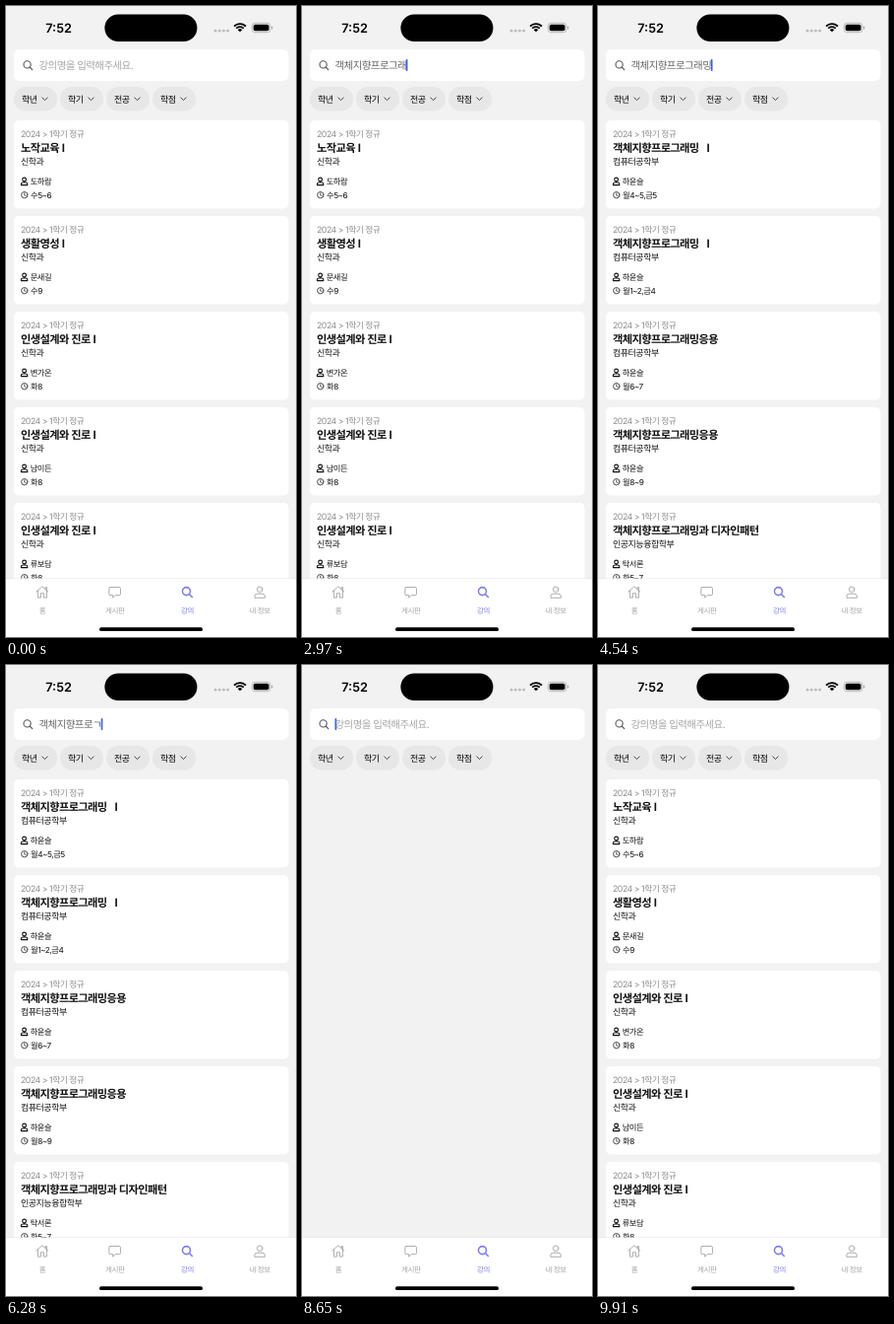
An HTML page with a canvas that plays this animation: 295 by 640 pixels, repeating every 10000 ms.

```html
<!DOCTYPE html>
<html lang="ko">
<head>
<meta charset="utf-8">
<title>강의 검색</title>
<style>
html, body { margin: 0; width: 100%; height: 100%; overflow: hidden; background: #f2f2f2; }
canvas { display: block; width: 295px; height: 640px; }
</style>
</head>
<body>
<canvas id="stage"></canvas>
<script>
const LOOP = 10000, STEP = 105;
const HANGUL = "'Noto Sans CJK KR', 'Noto Sans CJK', sans-serif";
const MIXED = 'Inter, ' + HANGUL;
const ACCENT = '#7d7df2';

const canvas = document.getElementById('stage');
const ctx = canvas.getContext('2d');
const dpr = window.devicePixelRatio || 1;
canvas.width = 295 * dpr;
canvas.height = 640 * dpr;

// Courses: title, department, lecturer, slot
const allCourses = [
  ['노작교육 I', '신학과', '도하람', '수5~6'],
  ['생활영성 I', '신학과', '문새길', '수9'],
  ['인생설계와 진로 I', '신학과', '변가온', '화8'],
  ['인생설계와 진로 I', '신학과', '남이든', '화8'],
  ['인생설계와 진로 I', '신학과', '류보담', '화8']
];
const foundCourses = [
  ['객체지향프로그래밍   I', '컴퓨터공학부', '하윤슬', '월4~5,금5'],
  ['객체지향프로그래밍   I', '컴퓨터공학부', '하윤슬', '월1~2,금4'],
  ['객체지향프로그래밍응용', '컴퓨터공학부', '하윤슬', '월6~7'],
  ['객체지향프로그래밍응용', '컴퓨터공학부', '하윤슬', '월8~9'],
  ['객체지향프로그래밍과 디자인패턴', '인공지능융합학부', '탁서론', '화5~7']
];

// Step tracks: [start time, value]
const queryTrack = [
  [0, ''], [860, 'ㄱ'], [980, '개'], [1220, '객'], [1380, '객체'], [1550, '객쳊'],
  [1700, '객체지'], [1820, '객체지햐'], [2240, '객체지향'], [2420, '객체지향프'],
  [2530, '객체지향프로'], [2680, '객체지향프록'], [2820, '객체지향프로글'],
  [2970, '객체지향프로그래'], [3450, '객체지향프로그래밍'],
  [5770, '객체지향프로그래미'], [5890, '객체지향프로그래ㅁ'], [6010, '객체지향프로그ㄹ'],
  [6150, '객체지향프로그'], [6275, '객체지향프로ㄱ'], [6400, '객체지향프로'],
  [6525, '객체지향프ㄹ'], [6650, '객체지향프'], [6775, '객체지향ㅍ'], [6900, '객체지향'],
  [7140, '객체지ㅎ'], [7260, '객체지'], [7380, '객체ㅈ'], [7500, '객체'],
  [7620, '객ㅊ'], [7870, '객'], [7990, '개'], [8120, '']
];
const caretTrack = [
  [0, 0], [210, .5], [330, 1], [3660, .3], [3765, 0], [3870, .5], [3975, 1],
  [4660, 0], [4900, .5], [5010, 1], [5470, 0], [5770, 1],
  [8755, .5], [8860, 0], [9065, .5], [9170, 1], [9770, .5], [9910, 0]
];
const listFade = [0, 0, .28, .55, .82, 1];
const messageFade = [0, .9, .9, .5, .2, 0];

const valueAt = (track, t) => track.findLast(([start]) => start <= t)[1];

function text(str, x, middle, size, color, { weight = 400, align = 'left', spacing = -.055, family = MIXED } = {}) {
  ctx.font = `${weight} ${size}px ${family}`;
  ctx.letterSpacing = `${spacing * size}px`;
  ctx.textAlign = align;
  ctx.fillStyle = color;
  ctx.fillText(str, x, middle + size * .375);
  return ctx.measureText(str).width;
}

function box(x, y, w, h, r, color) {
  ctx.fillStyle = color;
  ctx.beginPath();
  ctx.roundRect(x, y, w, h, r);
  ctx.fill();
}

function disc(x, y, r, color) {
  ctx.fillStyle = color;
  ctx.beginPath();
  ctx.arc(x, y, r, 0, 7);
  ctx.fill();
}

// Strokes an SVG path drawn around the point (x, y)
function icon(path, x, y, color, width = 1) {
  ctx.save();
  ctx.translate(x, y);
  ctx.strokeStyle = color;
  ctx.lineWidth = width;
  ctx.lineCap = ctx.lineJoin = 'round';
  ctx.stroke(new Path2D(path));
  ctx.restore();
}

const ICONS = {
  magnifier: 'M3 -.6A3.6 3.6 0 1 1 -4.2 -.6A3.6 3.6 0 1 1 3 -.6M2 2L4.6 4.6',
  chevron: 'M-2.7 -1.3L0 1.4L2.7 -1.3',
  lecturer: 'M1.9 -2A1.9 1.9 0 1 1 -1.9 -2A1.9 1.9 0 1 1 1.9 -2M-3.2 3.6V2.8Q-3.2 1 -1.4 1H1.4Q3.2 1 3.2 2.8V3.6Z',
  clock: 'M3.2 0A3.2 3.2 0 1 1 -3.2 0A3.2 3.2 0 1 1 3.2 0M0 -1.8V.2L1.3 .9',
  home: 'M-6 -.3L0 -5.8L6 -.3M3.3 -3V-5H4.6V-1.8M-4.5 -1.5V5.6H-1.5V1.2H1.5V5.6H4.5V-1.5',
  board: 'M-4.7 -5H4.7Q5.8 -5 5.8 -3.9V2Q5.8 3.1 4.7 3.1H.6L-2 5.6V3.1H-4.7Q-5.8 3.1 -5.8 2V-3.9Q-5.8 -5 -4.7 -5Z',
  search: 'M3.1 -.9A4 4 0 1 1 -4.9 -.9A4 4 0 1 1 3.1 -.9M2 2L5 5',
  profile: 'M2.8 -2.8A2.8 2.8 0 1 1 -2.8 -2.8A2.8 2.8 0 1 1 2.8 -2.8M-5.2 5.4V4.2Q-5.2 1.7 -2.7 1.7H2.7Q5.2 1.7 5.2 4.2V5.4Z'
};

function drawStatusBar() {
  text('7:52', 40.2, 22, 12.75, '#000', { weight: 600, spacing: 0 });
  box(100.4, 8.4, 94, 27.6, 13.8, '#000');
  for (let i = 0; i < 4; i++) disc(213 + i * 4.2, 25.2, 1.4, '#bbb');

  const wifiX = 238, wifiY = 26.2, half = .82;
  ctx.strokeStyle = ctx.fillStyle = '#000';
  ctx.lineWidth = 1.9;
  ctx.lineCap = 'butt';
  for (const r of [8.1, 5.1]) {
    ctx.beginPath();
    ctx.arc(wifiX, wifiY, r, -Math.PI / 2 - half, -Math.PI / 2 + half);
    ctx.stroke();
  }
  ctx.beginPath();
  ctx.moveTo(wifiX, wifiY);
  ctx.arc(wifiX, wifiY, 3, -Math.PI / 2 - half, -Math.PI / 2 + half);
  ctx.fill();

  ctx.strokeStyle = '#aaa';
  ctx.lineWidth = .8;
  ctx.beginPath();
  ctx.roundRect(250.3, 17.3, 18.6, 9.4, 3);
  ctx.stroke();
  box(251.7, 18.7, 15.8, 6.6, 1.8, '#000');
  box(270, 20.4, 1.2, 3.2, .6, '#aaa');
}

function drawSearchField(t) {
  const query = valueAt(queryTrack, t);
  box(8, 44, 279.5, 32, 6, '#fff');
  icon(ICONS.magnifier, 22.2, 60, '#555', 1.1);
  const width = text(query || '강의명을 입력해주세요.', 33.5, 60, 10.5, query ? '#666' : '#a6a6a6');
  ctx.globalAlpha = valueAt(caretTrack, t);
  box(query ? 33.5 + width - .4 : 33.5, 54, 1.7, 12, .7, '#3565ee');
  ctx.globalAlpha = 1;
}

function drawFilters() {
  ['학년', '학기', '전공', '학점'].forEach((label, i) => {
    const x = 8 + i * 47;
    box(x, 82, 44, 24.5, 12, '#e7e7e7');
    text(label, x + 8, 94.2, 9, '#000', { weight: 500 });
    icon(ICONS.chevron, x + 31.5, 94.2, '#333', .9);
  });
}

function drawCard([title, department, lecturer, slot], y) {
  box(8, y, 279.5, 89.5, 5, '#fff');
  text('2024 > 1학기 정규', 15, y + 13.5, 8.75, '#8c8c8c');
  text(title, 15, y + 27.5, 11.25, '#111', { weight: 700, family: HANGUL });
  text(department, 15, y + 41.5, 9, '#111');
  icon(ICONS.lecturer, 18.6, y + 62, '#111', 1.1);
  text(lecturer, 24.7, y + 62, 8.25, '#111');
  icon(ICONS.clock, 18.8, y + 75.7, '#222', .8);
  text(slot, 25, y + 75.7, 8.25, '#111');
}

function drawList(t) {
  const reload = t >= 8650 ? 8650 : 3450;
  const step = t < reload ? 5 : Math.min(5, Math.floor((t - reload) / STEP));
  const courses = t >= 3450 && t < 8650 ? foundCourses : allCourses;

  ctx.save();
  ctx.beginPath();
  ctx.rect(0, 107, 295, 474);
  ctx.clip();
  ctx.globalAlpha = listFade[step];
  courses.forEach((course, i) => drawCard(course, 116 + i * 97));
  ctx.globalAlpha = messageFade[step];
  text('검색된 강의가 없습니다.', 147.2, 303.5, 10.5, '#222', { align: 'center' });
  ctx.restore();
}

function drawTabs() {
  box(0, 581, 295, 59, 0, '#fff');
  box(0, 580.5, 295, .5, 0, '#e4e4e4');
  [['home', '홈'], ['board', '게시판'], ['search', '강의'], ['profile', '내 정보']].forEach(([name, label], i) => {
    const x = 36.9 + i * 73.75, active = name === 'search';
    icon(ICONS[name], x, 594.5, active ? ACCENT : '#a3a3a3', active ? 1.6 : .9);
    text(label, x, 613, 7.5, active ? ACCENT : '#a3a3a3', { align: 'center', weight: active ? 500 : 400 });
  });
  box(95, 630.3, 105, 3.7, 1.85, '#000');
}

function draw(now) {
  const t = now % LOOP;
  ctx.setTransform(dpr, 0, 0, dpr, 0, 0);
  ctx.textRendering = 'geometricPrecision';
  box(0, 0, 295, 640, 0, '#f2f2f2');
  drawStatusBar();
  drawSearchField(t);
  drawFilters();
  drawList(t);
  drawTabs();
}

const start = performance.now();
function tick() {
  draw(performance.now() - start);
  requestAnimationFrame(tick);
}
tick();
</script>
</body>
</html>
```
